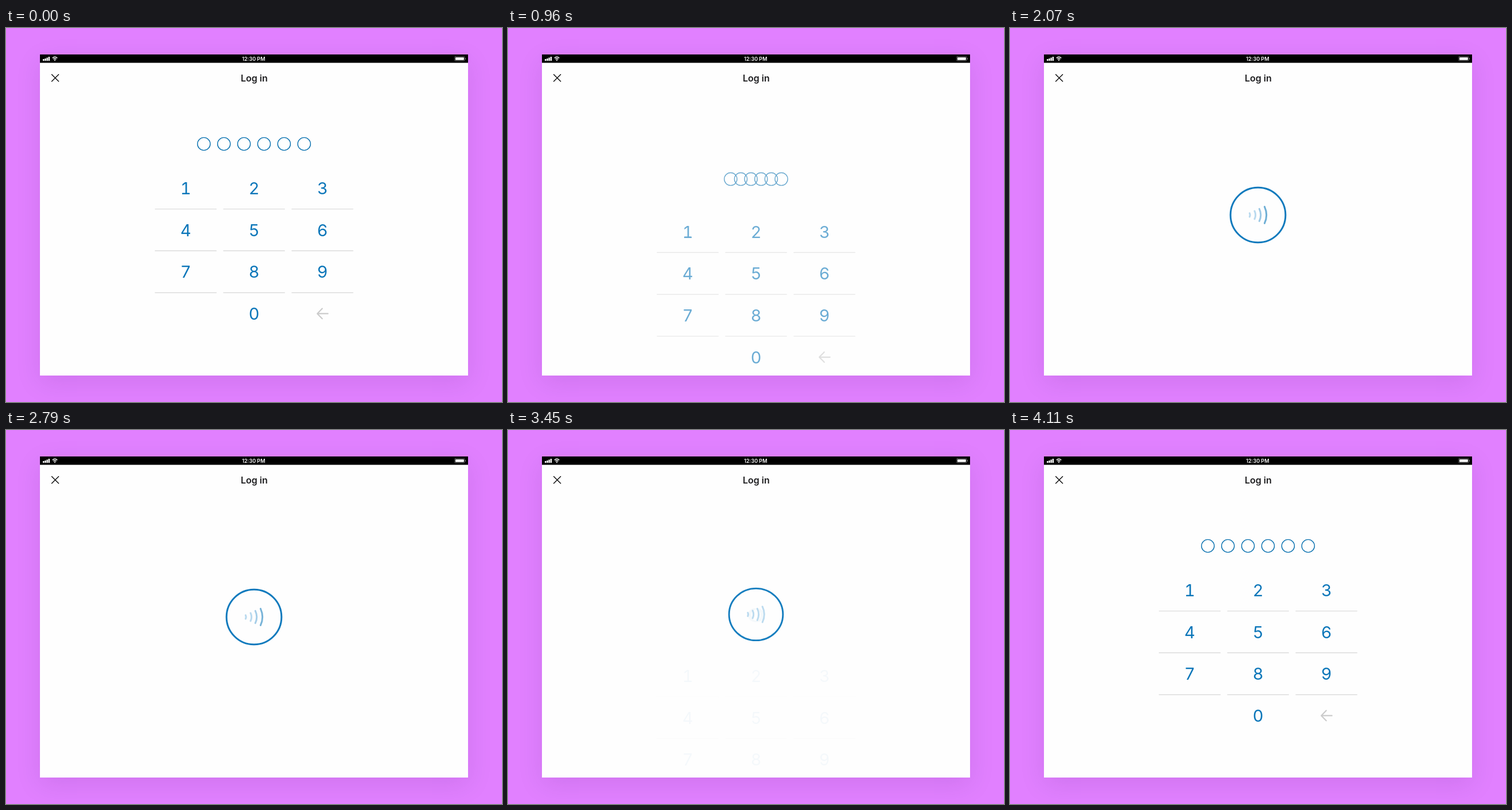
An HTML page for the animation above (4.23 s loop, 862x650 px).

```html
<!DOCTYPE html>
<html lang="en">
<head>
<meta charset="utf-8">
<title>Log in</title>
<style>
  html, body { margin: 0; width: 100%; height: 100%; overflow: hidden; background: #e180ff; }
  .card { position: absolute; left: 59px; top: 46px; width: 744px; height: 558px;
    background: #fefefe; box-shadow: 0 12px 42px rgba(50, 0, 90, .1); }
  svg { position: absolute; left: 0; top: 0; fill: none; stroke-linecap: round; }
  text { font-family: Inter, "Liberation Sans", sans-serif; text-anchor: middle; }
  .key { font-size: 29px; font-feature-settings: "tnum"; fill: #0b76b9; }
  .rule { stroke: #dcdcdc; stroke-width: 1.4; stroke-linecap: butt; }
</style>
</head>
<body>
<div class="card"></div>
<svg width="862" height="650" viewBox="0 0 862 650">
  <clipPath id="screen"><rect x="59" y="60" width="744" height="544"/></clipPath>

  <!-- status bar -->
  <path d="M59 46H803V60.5H59Z" fill="#000"/>
  <path d="M64 54h2.4v3H64zM67.2 53h2.4v4h-2.4zM70.4 51.5h2.4v5.5h-2.4zM73.6 50h2.4v7h-2.4z" fill="#fff"/>
  <path d="M80.6 52.2Q84.9 48.4 89.2 52.2M82.4 54.2Q84.9 52 87.4 54.2" stroke="#fff" stroke-width="1.4" stroke-linecap="butt"/>
  <path d="M83.4 55.4Q84.9 54.2 86.4 55.4L84.9 57.2Z" fill="#fff"/>
  <text x="430.3" y="57" font-size="9" font-weight="600" fill="#fff">12:30 PM</text>
  <rect x="779.6" y="49.6" width="17.6" height="7.6" rx="1.6" stroke="#777" stroke-width=".8"/>
  <rect x="781" y="51" width="14.8" height="4.8" rx=".6" fill="#fff"/>
  <path d="M798.4 52.4v2" stroke="#777"/>

  <!-- header -->
  <path d="M79.5 80.8l12 12m0-12l-12 12" stroke="#111" stroke-width="1.5"/>
  <text x="431.3" y="92.8" font-size="16" font-weight="600" fill="#1c1c1e">Log in</text>

  <g clip-path="url(#screen)">
    <g id="pad"></g>
    <g id="dots" stroke="#0b72b0" stroke-width="1.4"></g>
    <g id="ring" stroke-width="3">
      <circle r="47.8" stroke="#0f7abd"/>
      <g id="waves"></g>
    </g>
  </g>
</svg>
<script>
const LOOP = 4230, CX = 431, CY = 325, DOT_Y = 201.5;
const $ = id => document.getElementById(id);
const clamp = v => Math.max(0, Math.min(1, v));
const ease = x => x < .5 ? 2 * x * x : 1 - 2 * (1 - x) ** 2;

function add(parent, tag, attrs, label) {
  const el = document.createElementNS('http://www.w3.org/2000/svg', tag);
  for (const k in attrs) el.setAttribute(k, attrs[k]);
  if (label) el.textContent = label;
  return parent.appendChild(el);
}

const pad = $('pad'), ring = $('ring');
[...'123456789 0'].forEach((key, i) => {
  const col = i % 3, row = Math.floor(i / 3);
  const x = 312.3 + col * 118.8, y = 289 + row * 72.7;
  if (key !== ' ') add(pad, 'text', { class: 'key', x, y }, key);
  if (row < 3) add(pad, 'path', { class: 'rule', d: `M${x - 53.6} ${y + 25.6}h107.2` });
});
// foot of the "1"
add(pad, 'path', { d: 'M306.5 287.9h12', stroke: '#0b76b9', 'stroke-width': 2.2, 'stroke-linecap': 'butt' });
add(pad, 'path', { d: 'M559.5 496.4H541M549.6 487.6L541 496.4L549.6 505.2', stroke: '#cbcbcb', 'stroke-width': 2.2, 'stroke-linejoin': 'round' });

const dots = [...Array(6)].map(() => add($('dots'), 'circle', { r: 11.1 }));
const waves = [[-14.6, 3.2, 1.6], [-6, 7, 3.4], [2.3, 10.6, 5], [11.4, 14.4, 6.6]].map(([x, h, bend]) =>
  add($('waves'), 'path', { d: `M${x} ${-h}Q${x + bend} 0 ${x} ${h}` }));

// 0 = keypad, 1 = scanner
const scanAmount = t => t < 2000 ? ease(clamp((t - 782) / 360)) : 1 - ease(clamp((t - 3382) / 600));

// quick rise, slower linear fade, three times
function glow(t, i) {
  let level = 0;
  for (let n = 0; n < 3; n++) {
    const d = t - (990 + n * 705 + i * 75);
    level = Math.max(level, clamp(d < 0 ? 1 + d / 75 : 1 - d / 274));
  }
  return level;
}

function shake(t) {
  const period = 170, cycles = (t - 3090) / period;
  return Math.abs(cycles) < 1.25 ? -7.3 * Math.cos(2 * Math.PI * cycles) : 0;
}

function mix(a, b, k) {
  return `rgb(${a.map((v, i) => Math.round(v + (b[i] - v) * k))})`;
}

function draw(t) {
  const p = scanAmount(t), u = 1 - p, fade = 1 - p ** 1.3;
  pad.setAttribute('transform', `translate(0 ${153 * p})`);
  pad.setAttribute('opacity', fade);
  dots.forEach((dot, i) => {
    dot.setAttribute('cx', CX + (i - 2.5) * 34.85 * u);
    dot.setAttribute('cy', DOT_Y + (CY - DOT_Y) * p);
  });
  $('dots').setAttribute('opacity', fade);

  // the scanner flattens as it rises
  const sx = 1 - .77 * u, sy = Math.max(0, 1 - 2.1 * u);
  ring.setAttribute('visibility', sy > 0 ? 'visible' : 'hidden');
  ring.setAttribute('opacity', clamp(1 - 1.2 * u));
  ring.setAttribute('transform', `translate(${CX + shake(t)} ${CY - 170 * u}) scale(${sx} ${sy})`);
  waves.forEach((wave, i) =>
    wave.setAttribute('stroke', mix([186, 218, 239], [20, 122, 180], glow(t, i))));
}

function tick() {
  draw(performance.now() % LOOP);
  requestAnimationFrame(tick);
}
tick();
</script>
</body>
</html>
```
